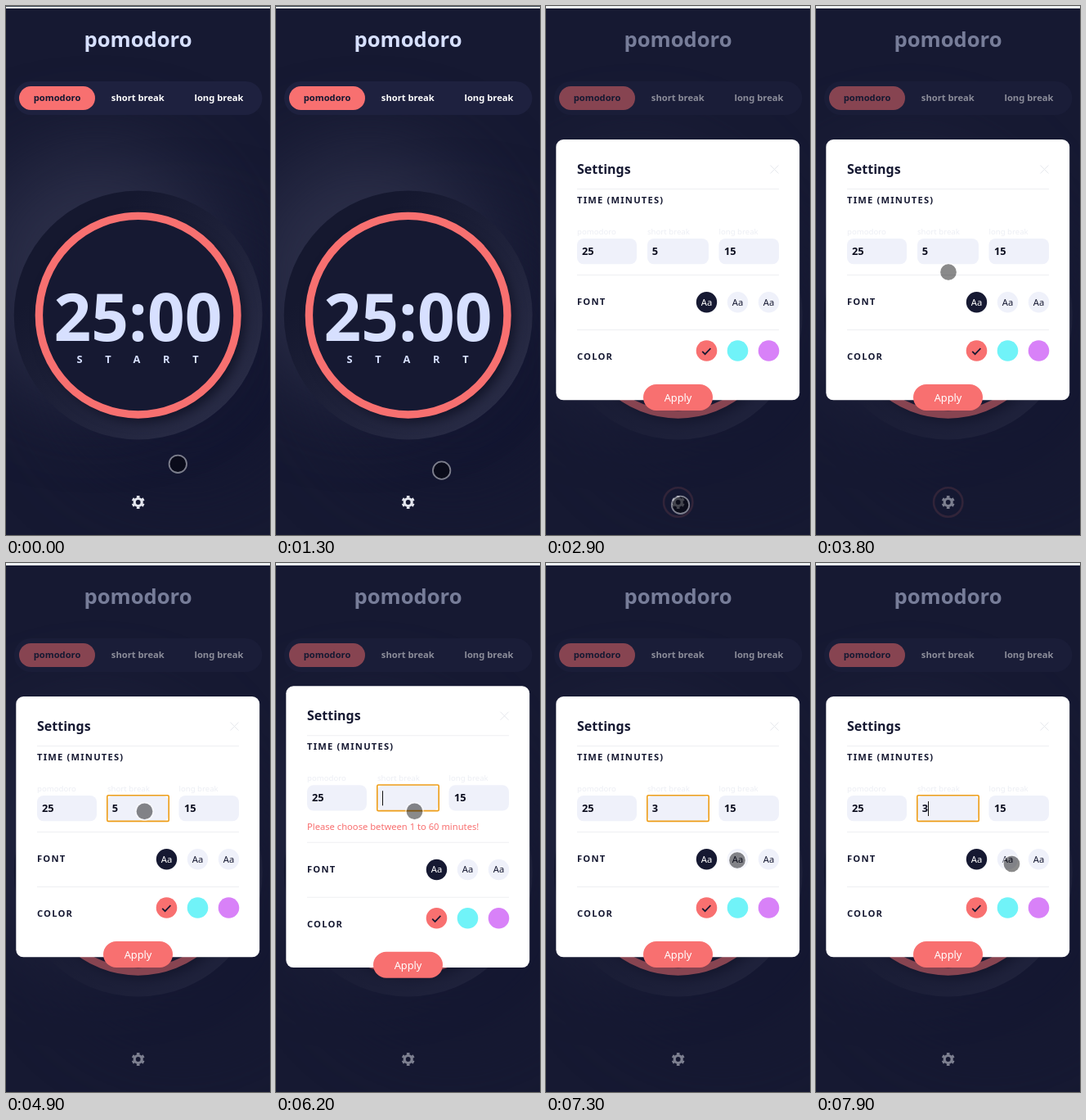
These frames come from a looping animation (323x646 px, 8000 ms). An HTML page:

```html
<!DOCTYPE html>
<html lang="en">
<head>
<meta charset="utf-8">
<title>pomodoro</title>
<style>
  html, body { margin: 0; width: 100%; height: 100%; overflow: hidden; background: #161932; }
  svg { display: block; font-family: "Noto Sans", "Open Sans", sans-serif; }
  .bold { font-weight: 700; }
  .mid { text-anchor: middle; }
  .small { font-size: 11.2px; }
  .head { font-size: 11.2px; font-weight: 700; letter-spacing: 1.2px; }
  .label { font-size: 9.6px; fill: #eceef4; }
  .value { font-size: 12.8px; font-weight: 700; fill: #0b0d1e; }
  .field { fill: #eff1fa; }
  .rule { stroke: #eeeff2; }
  .line { fill: none; stroke: #161932; }
</style>
</head>
<body>
<svg width="323" height="646" viewBox="0 0 323 646">
  <defs>
    <linearGradient id="rim" x1="0" y1="0" x2="1" y2="1">
      <stop offset=".25" stop-color="#15182f"/>
      <stop offset=".85" stop-color="#282b45"/>
    </linearGradient>
  </defs>
  <rect width="323" height="646" fill="#161932"/>

  <g id="page">
    <circle cx="211.5" cy="427.5" r="152" fill="#121530" style="filter:blur(50px)"/>
    <circle cx="111.5" cy="327.5" r="152" fill="#2b2e48" style="filter:blur(50px)"/>
    <text class="bold mid" x="161.5" y="50" font-size="25.6" fill="#d7e0ff">pomodoro</text>

    <rect x="10" y="92" width="303.5" height="41" rx="20.5" fill="#1e213f"/>
    <rect x="16" y="98" width="93" height="29" rx="14.5" fill="#f87070"/>
    <g class="bold mid small" fill="#fff">
      <text x="62.5" y="116" fill="#161932">pomodoro</text>
      <text x="161.3" y="116">short break</text>
      <text x="260.5" y="116">long break</text>
    </g>

    <circle cx="161.7" cy="377.5" r="152" fill="url(#rim)"/>
    <circle cx="168" cy="384" r="124" fill="#121428" style="filter:blur(7px)"/>
    <circle cx="161.7" cy="377.7" r="121.3" fill="#161932" stroke="#f87070" stroke-width="9.4"/>
    <g class="bold" fill="#d7e0ff">
      <text class="mid" x="161.5" y="409" font-size="80">25:00</text>
      <text x="86.5" y="436" font-size="12.8" letter-spacing="27.7">START</text>
    </g>

    <g transform="translate(161.7 606)" fill="none" stroke="#e4e6ee">
      <circle r="4.5" stroke-width="3.2"/>
      <circle r="6.8" stroke-width="2.5" pathLength="12" stroke-dasharray="1 1" stroke-dashoffset="-.5"/>
    </g>
  </g>
  <circle id="gearFocus" cx="161.7" cy="606" r="17.7" fill="none" stroke="#312439" stroke-width="2.6"/>

  <g id="modal" fill="#161932">
    <rect id="sheet" x="12.3" width="297.9" rx="9" fill="#fff"/>
    <g id="upper">
      <text class="bold" x="38" y="205" font-size="16">Settings</text>
      <path d="M274.5 194.500l10 10m0-10l-10 10" fill="none" stroke="#e6e8ed"/>
      <path class="rule" d="M38 223.500H285"/>
      <text class="head" x="38" y="241">TIME (MINUTES)</text>
      <g class="label">
        <text x="38" y="279">pomodoro</text>
        <text x="124" y="279">short break</text>
        <text x="211.500" y="279">long break</text>
      </g>
      <rect class="field" x="38" y="284" width="73" height="31.3" rx="8"/>
      <rect class="field" x="124" y="284" width="75" height="31.3" rx="8"/>
      <rect class="field" x="211.500" y="284" width="73.500" height="31.3" rx="8"/>
      <g class="value">
        <text x="44" y="304">25</text>
        <text id="short" x="129.700" y="304"></text>
        <text x="218" y="304">15</text>
      </g>
      <rect id="outline" x="123.800" y="283.800" width="75.400" height="31.600" rx="1.500" fill="none" stroke="#ee9d17" stroke-width="1.600"/>
      <rect id="caret" y="291" width="1" height="18" fill="#111"/>
    </g>
    <text id="error" class="small" x="38" y="326" fill="#f87070">Please choose between 1 to 60 minutes!</text>
    <g id="lower">
      <path class="rule" d="M38 328.500H285M38 395.500H285"/>
      <text class="head" x="38" y="365">FONT</text>
      <text class="head" x="38" y="432">COLOR</text>
      <circle cx="196.500" cy="361.700" r="12.700"/>
      <circle class="field" cx="234.500" cy="361.700" r="12.700"/>
      <circle class="field" cx="272.500" cy="361.700" r="12.700"/>
      <g class="small mid">
        <text x="196.500" y="365.500" fill="#fff">Aa</text>
        <text x="234.500" y="365.500">Aa</text>
        <text x="272.500" y="365.500">Aa</text>
      </g>
      <circle cx="196.500" cy="421" r="12.800" fill="#f87070"/>
      <circle cx="234.500" cy="421" r="12.800" fill="#70f3f8"/>
      <circle cx="272.500" cy="421" r="12.800" fill="#d881f8"/>
      <path class="line" d="M191.200 421.800l3.400 3.400 6.800-7" stroke-width="1.700"/>
      <rect x="119" y="462" width="85" height="32" rx="16" fill="#f87070"/>
      <text class="mid" x="161.500" y="483" font-size="12.800" fill="#fff">Apply</text>
    </g>
  </g>

  <rect id="strip" width="323" height="3" fill="#eef3f4"/>
  <rect id="stripEdge" width="323" height="1" fill="#46525e"/>
  <g id="cursor">
    <circle r="10" fill="#000" opacity=".46"/>
    <circle r="10.700" fill="none" stroke="#fff" stroke-opacity=".45" stroke-width="1.800"/>
  </g>
</svg>
<script>
const LOOP = 8000, STEP = 100;
const el = id => document.getElementById(id);
const show = (id, on) => el(id).style.display = on ? '' : 'none';
const move = (id, x, y) => el(id).setAttribute('transform', `translate(${x} ${y})`);

// cursor path: time, x, y
const path = [
  [0, 210.3, 559.3], [1200, 210.3, 559.3], [1400, 195, 575], [1600, 164, 602], [1700, 155, 608],
  [1800, 157, 610], [1900, 164.5, 609.3], [3200, 164.5, 609.3], [3300, 172, 590], [3400, 193, 545],
  [3500, 207, 470], [3600, 198, 400], [3700, 176, 345], [3800, 162, 325], [3900, 162, 325],
  [4200, 169.5, 304], [4400, 169.5, 304], [4500, 169.5, 303.3], [6700, 169.5, 303.3],
  [6800, 169.5, 302], [7000, 185, 318], [7200, 225, 355], [7400, 243, 371], [7500, 243, 371],
  [7600, 242, 370], [7700, 242, 370], [7800, 239.5, 367.5], [LOOP, 239.5, 367.5]
];

function cursorAt(t) {
  const i = path.findIndex(p => p[0] > t);
  const [t0, x0, y0] = path[i - 1], [t1, x1, y1] = path[i];
  const k = (t - t0) / (t1 - t0);
  return [x0 + (x1 - x0) * k, y0 + (y1 - y0) * k];
}

function draw(time) {
  const t = Math.floor(time % LOOP / STEP) * STEP;
  const open = t >= 2900, focused = t >= 4400;
  const cleared = t >= 5200 && t < 6800;
  const value = cleared ? '' : t < 5200 ? '5' : '3';
  const grow = cleared ? 12.75 : 0;

  el('page').style.opacity = open ? .5 : 1;
  show('modal', open);
  show('stripEdge', !open);
  show('gearFocus', open && !focused);

  el('sheet').setAttribute('y', 163 - grow);
  el('sheet').setAttribute('height', 318.3 + 2 * grow);
  move('upper', 0, -grow);
  move('lower', 0, grow);
  show('error', cleared);
  el('short').textContent = value;
  show('outline', focused);

  // the caret restarts its blink on focus and on each key
  const blinkStart = [6800, 5200, 4400].find(s => t >= s);
  show('caret', focused && (t - blinkStart) % 1000 < 500);
  el('caret').setAttribute('x', value ? 137 : 130);

  move('cursor', ...cursorAt(t));
}

const start = performance.now();
(function tick() {
  draw(performance.now() - start);
  requestAnimationFrame(tick);
})();
</script>
</body>
</html>
```
